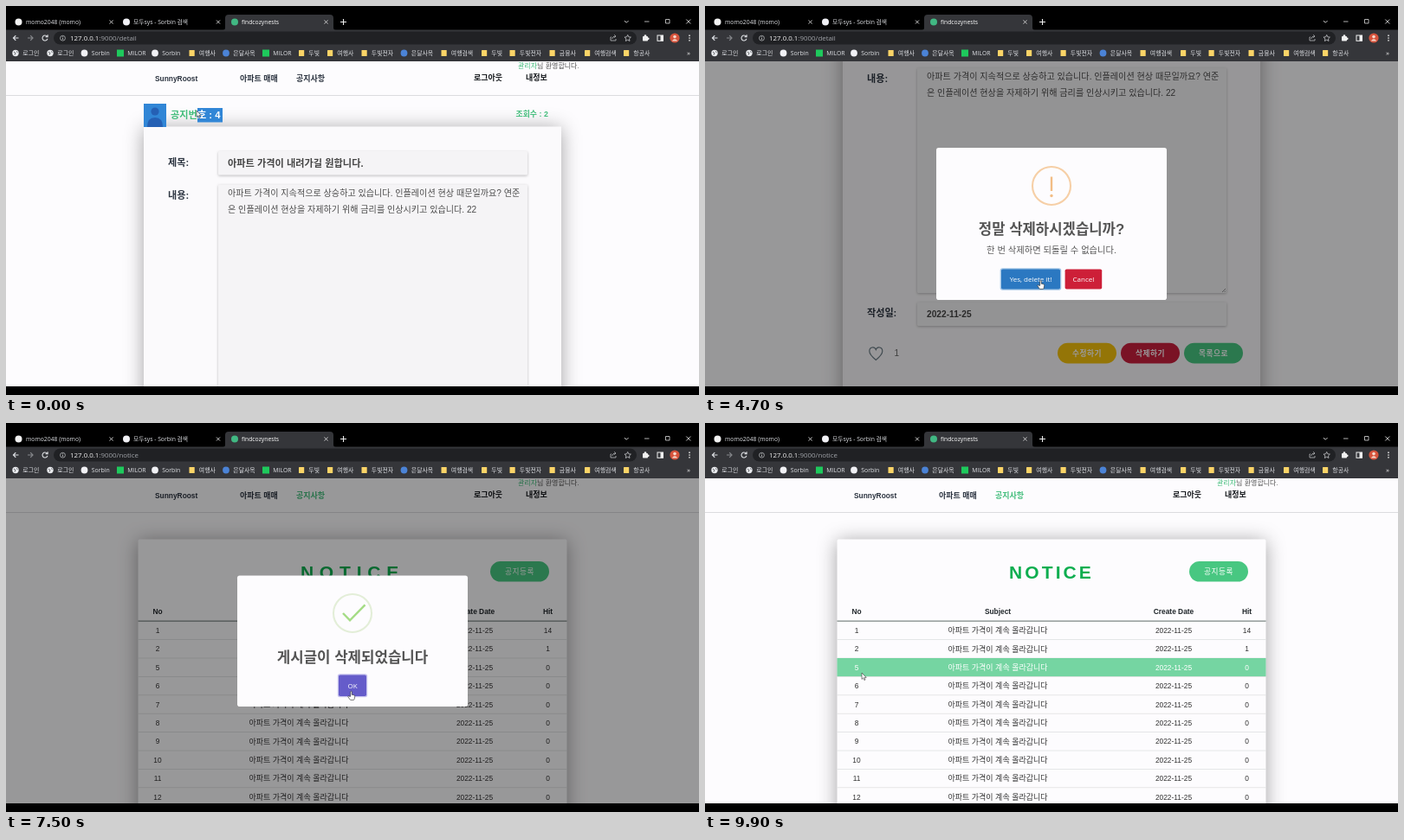
Write an HTML page that moves like this. It is 800x450 px and loops after 10 s.

```html
<!DOCTYPE html>
<html lang="ko">
<head>
<meta charset="utf-8">
<title>Notice board</title>
<style>
html, body { margin: 0; width: 100%; height: 100%; overflow: hidden; background: #000; }
svg { display: block; width: 800px; height: 450px; font-family: "Liberation Sans", "Noto Sans CJK KR", sans-serif; }
.ui { font-family: "Open Sans", "Noto Sans CJK KR", sans-serif; }
.soft { filter: drop-shadow(0 1px 1.5px rgba(0,0,0,.25)); }
.card { filter: drop-shadow(0 2px 11px rgba(0,0,0,.36)); }
.pill { letter-spacing: .5px; }
text { white-space: pre; }
</style>
</head>
<body>
<svg id="stage" viewBox="0 0 800 450" xmlns="http://www.w3.org/2000/svg"></svg>
<script>
const GREEN = '#42bd7b', INK = '#2c3440', PAGE = '#fdfcfe';

// y is the vertical middle of the line
const text = (x, y, s, size, fill, extra = '') =>
  `<text x="${x}" y="${(y + size * .36).toFixed(2)}" font-size="${size}" fill="${fill}" ${extra}>${s}</text>`;
const bold = (x, y, s, size, fill, extra = '') => text(x, y, s, size, fill, 'font-weight="700" ' + extra);
const rect = (x, y, w, h, fill, extra = '') =>
  `<rect x="${x}" y="${y}" width="${w}" height="${h}" fill="${fill}" ${extra}/>`;
const dot = (x, y, r, fill, extra = '') => `<circle cx="${x}" cy="${y}" r="${r}" fill="${fill}" ${extra}/>`;
const line = (d, color, w = 1, extra = '') =>
  `<path d="${d}" fill="none" stroke="${color}" stroke-width="${w}" ${extra}/>`;
const mid = 'text-anchor="middle"';
const cross = (x, y, r, color = '#ddd') =>
  line(`M${x - r} ${y - r}l${2 * r} ${2 * r}m0 ${-2 * r}l${-2 * r} ${2 * r}`, color, .9);

const bookmarkIcons = {
  globe: x => dot(x, 54.5, 3.7, '#e8eaed') + line(`M${x - 2} 53l2 1.5l-1 2m2 -4l1.5 1`, '#55575c', .9),
  pale: x => dot(x, 54.5, 3.9, '#f1f1f5'),
  green: x => rect(x - 4, 50.5, 8, 8, '#1ec95c'),
  blue: x => dot(x, 54.5, 3.9, '#4b83d6'),
  folder: x => rect(x - 3, 51, 6.2, 7, '#fbd467', 'rx=".6"')
};

function browser() {
  const marks = [
    [11, 'globe', '로그인'], [51, 'globe', '로그인'], [90.5, 'pale', 'Sorbin'], [132, 'green', 'MILOR'],
    [172, 'pale', 'Sorbin'], [214.5, 'folder', '여행사'], [254, 'blue', '은달사옥'], [300, 'green', 'MILOR'],
    [341, 'folder', '두빛'], [374, 'folder', '여행사'], [413.5, 'folder', '두빛전자'], [459.5, 'blue', '은달사옥'],
    [505.5, 'folder', '여행검색'], [552, 'folder', '두빛'], [584.5, 'folder', '두빛전자'],
    [630.5, 'folder', '금융사'], [671, 'folder', '여행검색'], [716, 'folder', '항공사']
  ];
  const light = '#dfe1e5';
  return `<g class="ui">` + rect(0, 0, 800, 28, '#000') + rect(0, 27.5, 800, 36.5, '#35363a') +
    `<path d="M250 28q3 0 3-3v-11q0-4 4-4h117q4 0 4 4v11q0 3 3 3z" fill="#35363a"/>` +
    dot(14.5, 18.5, 4, '#f2f2f2') + text(23, 18.5, 'momo2048 (momo)', 6.8, light) + cross(121.5, 18.5, 2) +
    dot(139, 18.5, 4, '#f1f1f5') + text(147, 18.5, '모두sys - Sorbin 검색', 6.8, light) + cross(245, 18.5, 2) +
    dot(264, 18.5, 4, '#41b883') + text(272, 18.5, 'findcozynests', 6.8, '#fff') + cross(369.5, 18.5, 2) +
    line('M386 18.5h7m-3.5 -3.5v7', '#eee', 1.1) + line('M714 17l2.3 2.3l2.3 -2.3', '#ddd', .9) +
    line('M737 18h5.5M761.5 15.5h4.5v4.5h-4.5z', '#ddd', .8) + cross(787.8, 18, 2.5) +
    line('M14.5 37h-6m2.8 -2.8l-2.8 2.8l2.8 2.8', light, 1.2) +
    line('M25 37h6m-2.8 -2.8l2.8 2.8l-2.8 2.8', '#85878b', 1.2) +
    line('M47.4 35.2a3 3 0 1 0 .5 2.6m.2 -4.5v2.5h-2.5', light, 1.1) +
    rect(55, 29.5, 673, 15, '#202124', 'rx="7.5"') +
    dot(65.5, 37.2, 2.9, 'none', 'stroke="#b8babd" stroke-width=".8"') + line('M65.5 36.7v2.2m0 -3.6v.8', '#b8babd', .9) +
    text(74, 37.2, '127.0.0.1<tspan id="url" fill="#a0a3a8"></tspan>', 7.9, '#f1f1f1') +
    line('M699 36h-1v4h6v-2M699.7 38q.5 -3 4 -3m-1.5 -1.7l1.8 1.7l-1.8 1.7', '#b8babd', .8) +
    line('M717.7 33.4l1.1 2.4l2.6 .3l-1.9 1.8l.5 2.6l-2.3 -1.3l-2.3 1.3l.5 -2.6l-1.9 -1.8l2.6 -.3z', '#c8cacd', .8) +
    rect(735, 35, 6, 5.5, '#f1f1f1', 'rx=".7"') + dot(738, 34.7, 1.4, '#f1f1f1') + dot(741.2, 37.8, 1.4, '#f1f1f1') +
    rect(752, 34, 6.5, 6.3, 'none', 'stroke="#f1f1f1"') + rect(755.5, 34, 3, 6.3, '#f1f1f1') +
    dot(772, 37, 5.6, '#d6533c') + dot(772, 35.6, 1.8, '#f6d9cc') + `<path d="M768.7 40.5q3.3 -4.5 6.6 0z" fill="#f6d9cc"/>` +
    [34.2, 37, 39.8].map(y => dot(789, y, .85, '#e5e5e5')).join('') +
    marks.map(([x, icon, s]) => bookmarkIcons[icon](x) + text(x + 8.3, 54.5, s, 6.9, light)).join('') +
    text(786, 54.5, '»', 8, '#eee') + `</g>`;
}

const nav = active => rect(0, 64, 800, 39.5, PAGE) + rect(0, 103, 800, 1, '#dcdcdf') +
  bold(172, 84, 'SunnyRoost', 8.4, INK) + bold(270, 83.5, '아파트 매매', 9, INK) +
  bold(335, 83.5, '공지사항', 9, active ? GREEN : INK) +
  text(591, 69, `<tspan fill="${GREEN}">관리자</tspan>님 환영합니다.`, 8, '#555') +
  bold(540, 82.5, '로그아웃', 9, '#15181c') + bold(600, 82.5, '내정보', 9, '#15181c');

const pill = (x, y, s, fill, weight = 700) => rect(x, y, 68, 23.6, fill, 'rx="11.8"') +
  text(x + 34, y + 11.8, s, 8.7, '#fff', `${mid} class="pill" font-weight="${weight}"`);
const field = (y, h) => rect(245, y, 357, h, '#f5f4f6', 'rx="1.5" class="soft"');

function detailPage() {
  return nav(false) + rect(159, 139.5, 482, 480, '#fbfafc', 'class="card"') +
    rect(159, 113, 26, 27, '#3186d6') + dot(172, 122, 4.6, '#2560b4') +
    `<path d="M163 140q0 -11 9 -11t9 11z" fill="#2560b4"/>` +
    rect(221, 118, 29, 16.5, '#3186d6') +
    bold(190, 126, '공지번<tspan fill="#fff">호 : 4</tspan>', 11.2, GREEN) +
    bold(588.5, 125, '조회수 : 2', 8.9, GREEN) +
    bold(187, 181, '제목:', 11.1, INK) + bold(187, 219, '내용:', 11.1, INK) + bold(187, 490, '작성일:', 11.1, INK) +
    field(168, 27.5) + field(206.5, 260.5) + field(477.5, 27.5) +
    bold(256, 181.5, '아파트 가격이 내려가길 원합니다.', 11.2, '#444') +
    text(256, 216.5, '아파트 가격이 지속적으로 상승하고 있습니다. 인플레이션 현상 때문일까요? 연준', 10.1, '#4c4c4c') +
    text(256, 235.7, '은 인플레이션 현상을 자제하기 위해 금리를 인상시키고 있습니다. 22', 10.1, '#4c4c4c') +
    line('M597 466l4 -4m-1.5 4l1.5 -1.5', '#666', .7) +
    bold(256, 491, '2022-11-25', 10.2, '#444') +
    line('M197.3 544.5C192 540 189.8 537.5 189.8 534.2C189.8 529.5 195.5 528.2 197.3 532.6C199.1 528.2 204.8 529.5 204.8 534.2C204.8 537.5 202.6 540 197.3 544.5z', '#6b7c86', 1.2) +
    text(218.5, 536.5, '1', 10, '#666') +
    pill(407, 524.8, '수정하기', '#f6c20c') + pill(480, 524.8, '삭제하기', '#cb1f3e') + pill(553, 524.8, '목록으로', '#48c781');
}

const ROW = 21.4, TOP = 229.2, COLUMNS = [175, 338, 541, 625.5];
const centered = (cells, y, size, draw, fill) =>
  cells.map((s, i) => draw(COLUMNS[i], y, s, i === 1 && draw === text ? 9 : size, fill, mid)).join('');

function noticePage() {
  const rows = [1, 2, 5, 6, 7, 8, 9, 10, 11, 12].map((no, i) => {
    const y = TOP + ROW * i;
    const cells = [no, '아파트 가격이 계속 올라갑니다', '2022-11-25', [14, 1][i] || 0];
    return rect(152.5, y, 495, ROW, '#48c983', `id="back${i}" opacity="0"`) +
      `<g id="row${i}" fill="#333">${centered(cells, y + ROW / 2, 8.4, text, 'inherit')}</g>` +
      rect(152.5, y + ROW - .4, 495, .8, '#dfe1e2');
  }).join('');
  return nav(true) + rect(152.5, 134.5, 495, 330, PAGE, 'class="card" rx="2"') +
    bold(400, 172.5, 'NOTICE', 21, '#0eae50', mid + ' id="heading"') + pill(559, 160, '공지등록', '#48c781', 400) +
    centered(['No', 'Subject', 'Create Date', 'Hit'], 218.3, 8.4, bold, '#22282c') +
    rows.replaceAll('fill="inherit"', '') + rect(152.5, 228.6, 495, 1, '#5c6a66');
}

const button = (id, x, y, w, h, s, ring) =>
  (ring ? rect(x - 1.3, y - 1.3, w + 2.6, h + 2.6, ring, 'rx="2.8"') : '') +
  rect(x, y, w, h, '#000', `rx="1.8" id="${id}"`) + text(x + w / 2, y + h / 2, s, 8, '#fff', mid + ' class="ui"');

const confirmBox = () => rect(267, 164, 266, 176, '#fdfcfe', 'rx="2.8"') +
  `<g id="warn">${dot(0, 0, 22, 'none', 'stroke="#f6cfa6" stroke-width="2.1"')}` +
  line('M0 -10.5V6', '#f2bd85', 2.4) + dot(0, 11.5, 1.7, '#f2bd85') + '</g>' +
  bold(400, 258, '정말 삭제하시겠습니까?', 16.7, '#545454', mid) +
  text(400, 282.5, '한 번 삭제하면 되돌릴 수 없습니다.', 10.3, '#565656', mid) +
  button('yes', 342, 304.5, 68, 23, 'Yes, delete it!', '#a3c6e6') + button('cancel', 415.6, 304.5, 42.6, 23, 'Cancel');

const doneBox = () => rect(267, 176.5, 266, 151.5, '#fdfcfe', 'rx="2.8"') +
  dot(400, 220, 22, 'none', 'stroke="#e3eed8" stroke-width="2.1"') +
  line('M389 220l8 8.3l17.5 -18', '#a5dc86', 2.5, 'id="tick" pathLength="1" stroke-dasharray="1 2"') +
  bold(400, 270.5, '게시글이 삭제되었습니다', 16.8, '#545454', mid) +
  button('ok', 384, 291.5, 32, 24.5, 'OK', '#c9c5ee');

const arrow = `<path id="arrow" d="M0 0v7.4l1.7-1.5l1.2 2.6l1.2-.5l-1.2-2.6h2.3z" fill="#fff" stroke="#333" stroke-width=".6"/>`;
const hand = `<path id="hand" d="M-.8 .2q.8-.9 1.6 0v3.6l2.4.5q1.1.3 1 1.5l-.6 3.2q-.2.9-.9.9h-3.2q-.7 0-1.1-.7l-2-3q-.2-.9.6-1l1.4.8q.7.3.8-.4z" fill="#fff" stroke="#222" stroke-width=".6"/>`;

document.getElementById('stage').innerHTML =
  `<clipPath id="view">${rect(0, 64, 800, 376, '#000')}</clipPath>` +
  rect(0, 0, 800, 450, '#000') + `<g clip-path="url(#view)">` + rect(0, 64, 800, 376, PAGE) +
  `<g id="detail">${detailPage()}</g><g id="notice">${noticePage()}</g>` +
  rect(0, 64, 800, 376, '#000', 'id="shade"') +
  `<g id="confirm">${confirmBox()}</g><g id="done">${doneBox()}</g></g>` + browser() +
  `<g id="cursor">${arrow}${hand}</g>`;

const $ = id => document.getElementById(id);
const set = (id, attrs) => { for (const k in attrs) $(id).setAttribute(k, attrs[k]); };
const show = (id, on) => set(id, { display: on ? 'inline' : 'none' });
const clamp = v => Math.max(0, Math.min(1, v));
const ramp = (t, from, to) => clamp((t - from) / (to - from));
const smooth = v => v * v * (3 - 2 * v);

function track(keys, t, ease = v => v) {
  let i = 0;
  while (i < keys.length - 2 && t >= keys[i + 1][0]) i++;
  const [a, b] = [keys[i], keys[i + 1]], k = ease(ramp(t, a[0], b[0]));
  return a.slice(1).map((v, j) => v + (b[j + 1] - v) * k);
}

const PATH = [
  [0, 220, 121], [200, 220, 121], [1400, 513.5, 404.5], [2300, 513.5, 404.5], [3200, 387.5, 317.5],
  [4800, 387.5, 317.5], [5000, 437, 315], [5100, 437, 315], [5500, 512.5, 400.5], [5750, 512.5, 400.5],
  [6300, 386, 316], [6600, 386, 316], [7100, 398.5, 310.5], [7900, 398.5, 310.5], [8600, 163, 272],
  [9200, 163, 269], [9500, 181, 289], [10000, 181, 289]
];
const HAND = [[1300, 2400], [3000, 5150], [5400, 5850], [6200, 6650], [7000, 8000]];
const POP = [[0, .7], [135, 1.05], [240, .95], [300, 1]];
const CONFIRM = [[1800, 5100], [5610, 6500]], DONE = [[6800, 7900]];
const PAGE_SWAP = 6700;

// Animates one dialog through its open spans; returns its shade strength and age
function dialog(id, spans, t) {
  const span = spans.find(([a, b]) => t >= a && t < b + 150);
  show(id, span);
  if (!span) return { shade: 0, age: 0 };
  const age = t - span[0], out = ramp(t, span[1], span[1] + 150);
  const scale = track(POP, age)[0] * (1 - out / 2);
  set(id, { transform: `translate(400 252) scale(${scale}) translate(-400 -252)`, opacity: 1 - out });
  return { shade: ramp(age, 0, 100) * (1 - out), age };
}

function draw(t) {
  const onNotice = t >= PAGE_SWAP;
  show('detail', !onNotice);
  show('notice', onNotice);
  $('url').textContent = onNotice ? ':9000/notice' : ':9000/detail';
  set('detail', { transform: `translate(0 ${-135 * smooth(ramp(t, 300, 900))})` });

  const rest = 1 - ramp(t, 6900, 9900);
  set('heading', { 'letter-spacing': 3.1 + 5.8 * rest * rest });
  const hover = { 1: ramp(t, 8580, 8880) - ramp(t, 9300, 9600), 2: ramp(t, 9400, 9700) };
  for (const i in hover) {
    const v = Math.round(51 + 204 * hover[i]);
    set('back' + i, { opacity: hover[i] * .75 });
    set('row' + i, { fill: `rgb(${v},${v},${v})` });
  }

  const ask = dialog('confirm', CONFIRM, t), done = dialog('done', DONE, t);
  set('shade', { opacity: .4 * Math.max(ask.shade, done.shade) });
  const turn = smooth(ramp(ask.age, 60, 500));
  set('warn', { transform: `translate(400 208) scale(1 ${Math.max(.001, Math.cos((1 - turn) * Math.PI / 2))})`, opacity: turn });
  set('tick', { 'stroke-dashoffset': 1 - smooth(ramp(done.age, 100, 500)) });

  const [x, y] = track(PATH, t, smooth);
  const over = (left, right) => x > left && x < right && y > 291 && y < 328;
  set('yes', { fill: over(342, 410) ? '#2b78c1' : '#3085d6' });
  set('cancel', { fill: over(415, 458) ? '#b91c34' : '#cd1f38' });
  set('ok', { fill: over(384, 416) ? '#655cca' : '#7066e0' });
  const pointing = HAND.some(([a, b]) => t >= a && t < b);
  show('hand', pointing);
  show('arrow', !pointing);
  set('cursor', { transform: `translate(${x} ${y})` });
}

const start = performance.now();
function tick() {
  const t = (performance.now() - start) % 10000;
  draw(Math.floor(t / 100) * 100);
  requestAnimationFrame(tick);
}
tick();
</script>
</body>
</html>
```
